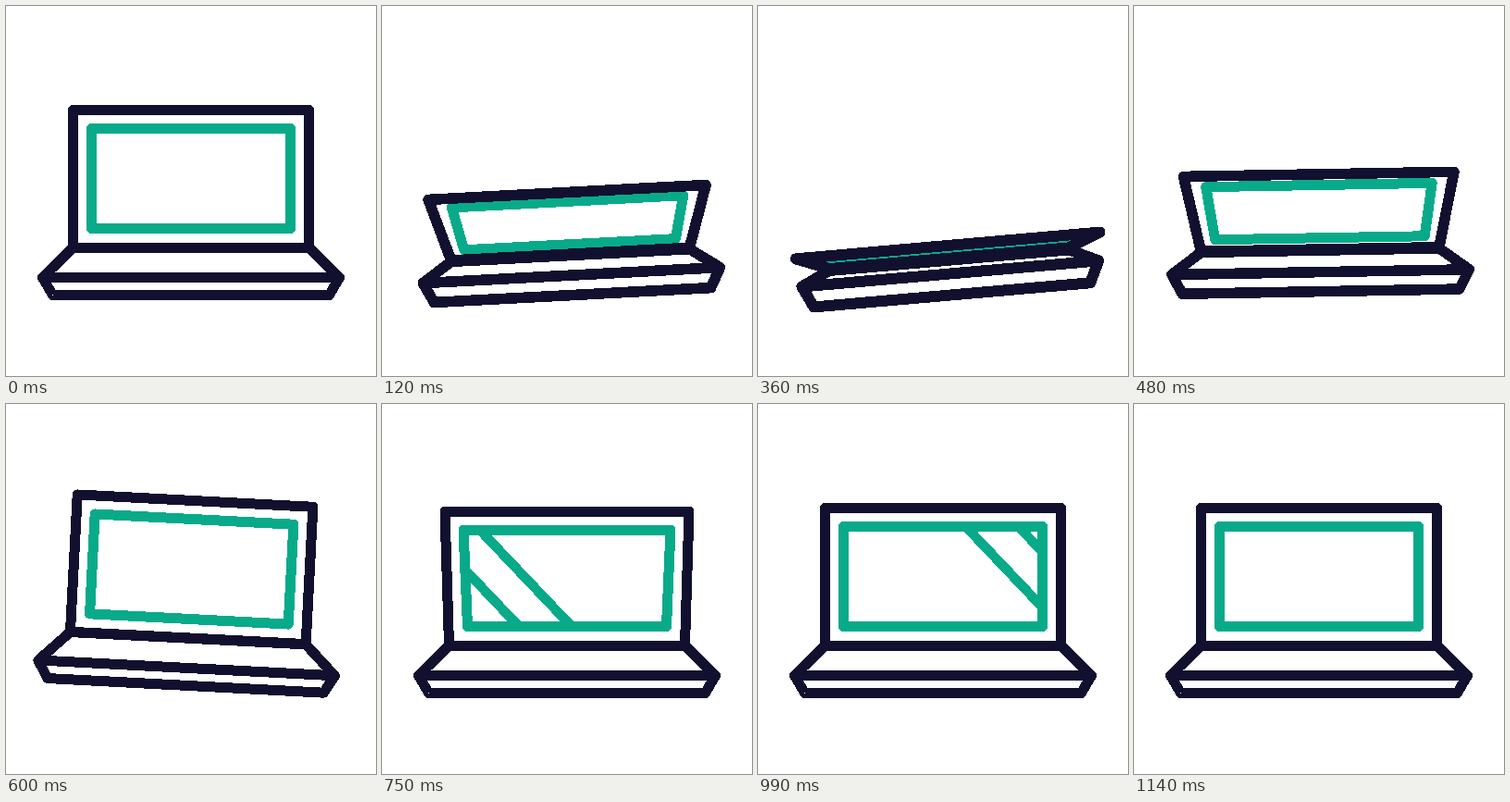
An HTML page that plays this animation: 400x400 px, repeating every 1410 ms.

```html
<!DOCTYPE html>
<html lang="en">
<head>
<meta charset="utf-8">
<title>Laptop</title>
<style>
  html, body { margin: 0; width: 100%; height: 100%; overflow: hidden; background: #fff; }
  svg { display: block; width: 100vw; height: 100vh; }
  path { fill: none; stroke-width: 11; stroke-linejoin: round; stroke-linecap: round; shape-rendering: crispEdges; }
  .dark { stroke: #11102e; }
  .green { stroke: #08aa8a; }
  #shine { stroke-width: 10.5; }
</style>
</head>
<body>
<svg viewBox="0 0 400 400">
  <clipPath id="glass"><path id="glassShape"/></clipPath>
  <g id="laptop">
    <path id="shine" class="green" clip-path="url(#glass)"/>
    <path id="frame" class="green"/>
    <path id="body" class="dark"/>
  </g>
</svg>
<script>
const LOOP = 1410, STEP = 30, LAST = 1140;
const $ = id => document.getElementById(id);
const mix = (a, b, k) => a + (b - a) * k;
const progress = (t, from, to) => Math.min(1, Math.max(0, (t - from) / (to - from)));
const smooth = u => (1 - Math.cos(Math.PI * u)) / 2;

// Trapezoid centred on x = 200
const trapezoid = (top, topHalf, bottom, bottomHalf) =>
  `M${200 - topHalf} ${top}H${200 + topHalf}L${200 + bottomHalf} ${bottom}H${200 - bottomHalf}Z`;

function draw(t) {
  const close = 1 - (1 - progress(t, 0, 360)) ** 2.3;
  const open = smooth(progress(t, 360, 600));
  const land = smooth(progress(t, 600, 735));
  const shut = close * (1 - open);
  const hop = open * (1 - land);
  const nod = Math.sin(Math.PI * progress(t, 660, 840)) ** 2;

  const hinge = mix(261, 273, shut), hingeHalf = mix(127.5, 130, shut);
  const back = mix(261.3, 275, shut);
  const front = mix(293.5, 289.8, shut), frontHalf = mix(160.5, 161, shut);
  const bottom = mix(312.5, 312.8, shut), bottomHalf = mix(149.5, 150, shut);
  const lid = trapezoid(mix(112.5, 259.2, shut) + 3.5 * nod, mix(127.5, 165, shut) + 4.5 * nod, hinge, hingeHalf);
  const glass = trapezoid(mix(132.5, 262.5, shut) + 3.5 * nod, mix(107.5, 137, shut) + 4.5 * nod,
                          mix(240.5, 269, shut), mix(107.5, 119, shut));

  $('body').setAttribute('d', lid + trapezoid(back, hingeHalf, front, frontHalf) +
    trapezoid(front, frontHalf, bottom, bottomHalf));
  $('body').style.strokeWidth = 11 + shut;
  $('frame').setAttribute('d', glass);
  $('glassShape').setAttribute('d', glass);

  // Two parallel glints crossing the glass, slowing slightly
  const n = (t - 750) / STEP;
  const x = 49 + 23.98 * n - 0.197 * n * n;
  const glint = x => `M${x - 15.5} 120L${x + 117.5} 260`;
  $('shine').setAttribute('d', t > 600 && t < LAST ? glint(x) + glint(x + 57) : '');

  const angle = -5 * shut + 3 * hop;
  $('laptop').setAttribute('transform', `translate(0 ${-8 * hop}) rotate(${angle} 200 200)`);
}

function tick() {
  const t = performance.now() % LOOP;
  draw(Math.min(LAST, Math.floor(t / STEP) * STEP));
  requestAnimationFrame(tick);
}
tick();
</script>
</body>
</html>
```
